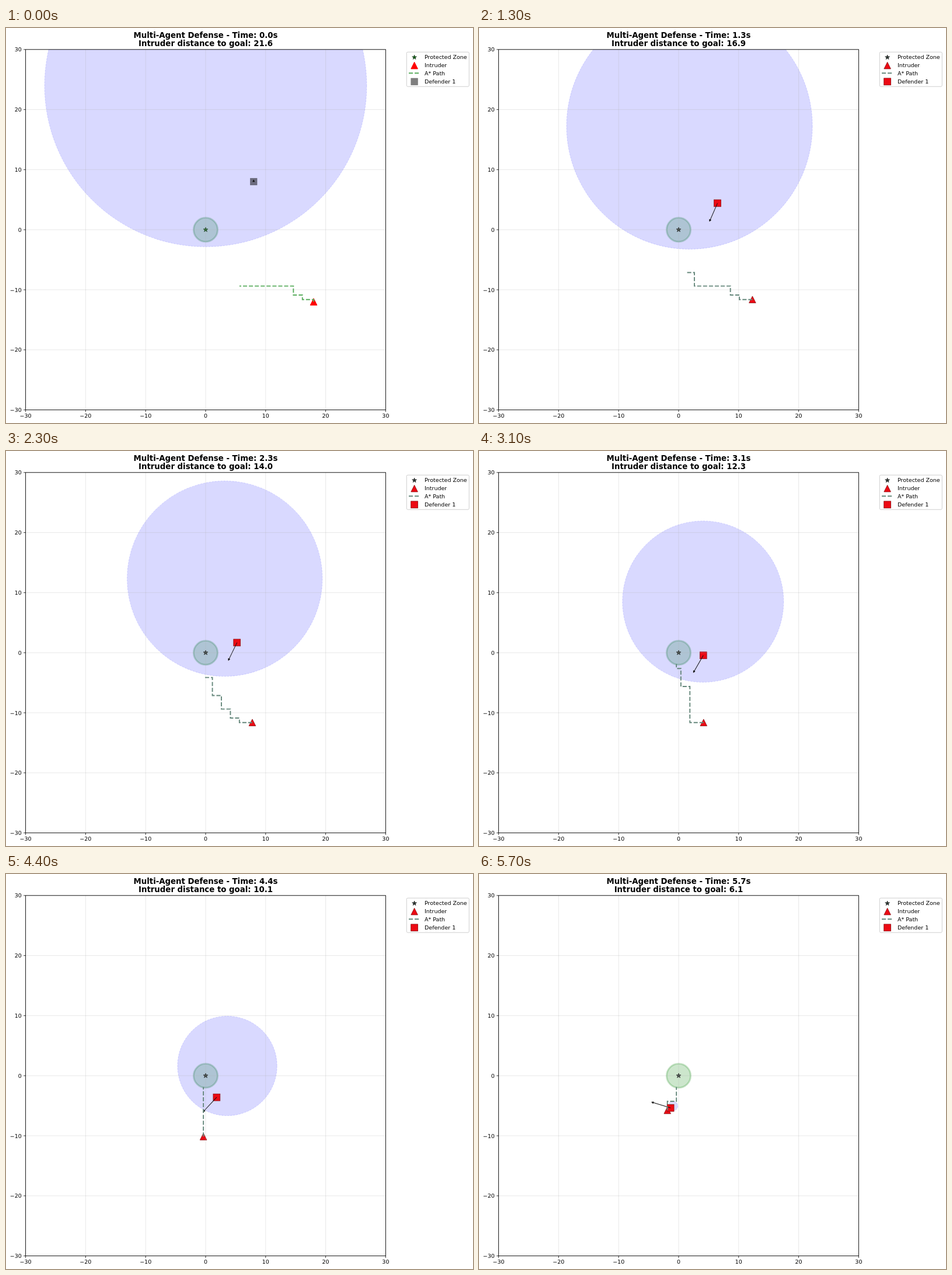
Write an HTML page that moves like this. It is 800x676 px and loops after 5.8 s.

```html
<!DOCTYPE html>
<html lang="en">
<head>
<meta charset="utf-8">
<title>Multi-Agent Defense</title>
<style>
html, body { margin: 0; width: 100%; height: 100%; overflow: hidden; background: #fff; }
svg { display: block; font: 9.5px "DejaVu Sans", sans-serif; }
.title { font-size: 13.3px; font-weight: bold; text-anchor: middle; }
</style>
</head>
<body>
<svg id="stage" width="800" height="676" viewBox="0 0 800 676"></svg>
<script>
const SCALE = 10.28, LOOP = 5800, STEP = 100;
const CELL = 0.75, ROW = -11.625, HORIZON = 14.25;
const INTRUDER_SPEED = 4.52, DEFENDER_SPEED = 3;
const GOAL = { x: -0.375, y: -1.875 };
const px = x => 342 + x * SCALE;
const py = y => 345.2 - y * SCALE;
const LEFT = px(-30), RIGHT = px(30), TOP = py(30), BOTTOM = py(-30);
const stage = document.getElementById('stage');
const clamp = u => Math.min(1, Math.max(0, u));

// Corners walked at constant speed
const corners = [
  [18, -12], [17.68, ROW], [-0.12, ROW], [GOAL.x, -11.37], [GOAL.x, -7.125], [-1.875, -7.125], [-1.875, 0]
];

function intruderAt(t) {
  let left = t * INTRUDER_SPEED;
  for (let i = 1; ; i++) {
    const [x, y] = corners[i - 1], dx = corners[i][0] - x, dy = corners[i][1] - y;
    const length = Math.hypot(dx, dy);
    if (left <= length) return { x: x + dx * left / length, y: y + dy * left / length };
    left -= length;
  }
}

// Bends slowly towards the intercept, then swerves after the intruder's last turn
function headingAt(t) {
  const degrees = 247 - 20 * clamp(t / 4.4) ** 3 - 64 * clamp((t - 4.95) / 0.75);
  return degrees * Math.PI / 180;
}

function defenderAt(t) {
  const dt = STEP / 1000;
  let x = 8, y = 8;
  for (let s = dt / 2; s < t; s += dt) {
    x += DEFENDER_SPEED * dt * Math.cos(headingAt(s));
    y += DEFENDER_SPEED * dt * Math.sin(headingAt(s));
  }
  return { x, y, heading: headingAt(t) };
}

// Staircase on the grid: first along the row, then towards the goal
function planFrom({ x, y }) {
  const points = [[x, y]];
  let length = 0;
  const go = (dx, dy) => {
    x += dx;
    y += dy;
    length += Math.abs(dx) + Math.abs(dy);
    points.push([x, y]);
  };
  if (y <= ROW) {
    const turn = CELL * Math.floor((x - 3 * CELL) / CELL) + CELL / 2;
    go(0, ROW - y);
    go(Math.max(turn, GOAL.x) - x, 0);
    if (x > 3) {
      go(0, CELL);
      go(-2 * CELL, 0);
      go(0, 2 * CELL);
    }
  }
  while (length < HORIZON && y < GOAL.y - 0.01) {
    const dx = GOAL.x - x, dy = GOAL.y - y;
    if (2 * Math.abs(dx) > dy + 0.01) go(Math.sign(dx) * Math.min(2 * CELL, Math.abs(dx)), 0);
    else go(0, Math.min(CELL, dy));
  }
  return points;
}

const line = (x1, y1, x2, y2, style) => `<path d="M${x1} ${y1}L${x2} ${y2}" ${style}/>`;
const text = (x, y, s, style = '') => `<text x="${x}" y="${y}" ${style}>${s}</text>`;
const circle = (x, y, r, style) => `<circle cx="${px(x)}" cy="${py(y)}" r="${r * SCALE}" ${style}/>`;
const triangle = (x, y, style) => `<path d="M${x} ${y - 5.8}l5.8 11.6h-11.6z" ${style}/>`;
const square = (x, y, style) => `<rect x="${x - 5.9}" y="${y - 5.9}" width="11.8" height="11.8" ${style}/>`;

function star(x, y, style) {
  const points = Array.from({ length: 10 }, (_, i) => {
    const r = i % 2 ? 1.6 : 4.1, a = i * Math.PI / 5;
    return `${x + r * Math.sin(a)},${y - r * Math.cos(a)}`;
  });
  return `<polygon points="${points.join(' ')}" ${style}/>`;
}

function arrow(p, length, angle) {
  const tip = length * SCALE;
  return `<g transform="translate(${px(p.x)} ${py(p.y)}) rotate(${-angle * 180 / Math.PI})" fill="#111" stroke="#111">
    <path d="M0 0H${tip}" stroke-width="1"/>
    <path d="M${tip} -1.5L${tip + 3.1} 0L${tip} 1.5z" stroke-width=".8"/></g>`;
}

let grid = '', axes = '';
for (let v = -30; v <= 30; v += 10) {
  const x = px(v), y = py(v), label = String(v).replace('-', '\u2212');
  const faint = 'stroke="#b0b0b0" stroke-opacity=".32" stroke-width=".9"';
  const tick = 'stroke="#000" stroke-width=".8"';
  grid += line(x, TOP, x, BOTTOM, faint) + line(LEFT, y, RIGHT, y, faint);
  axes += line(x, BOTTOM, x, BOTTOM + 3.4, tick) + line(LEFT, y, LEFT - 3.4, y, tick) +
    text(x, 667.3, label, 'text-anchor="middle"') + text(26.8, y + 3.6, label, 'text-anchor="end"');
}
const frame = `x="${LEFT}" y="${TOP}" width="${RIGHT - LEFT}" height="${BOTTOM - TOP}"`;
axes += `<rect ${frame} fill="none" stroke="#000" stroke-width=".9"/>`;

function render(t) {
  const idle = t === 0;
  const intruder = intruderAt(t), defender = defenderAt(t);
  const dx = defender.x - intruder.x, dy = defender.y - intruder.y;
  const edged = 'fill="#ec0a14" stroke="#8a1015" stroke-width=".8"';
  const red = idle ? 'fill="#f00" stroke="#f00"' : edged;
  const guard = idle ? 'fill="#000" fill-opacity=".5" stroke="#000" stroke-opacity=".3" stroke-width=".6"' : edged;
  const goal = idle ? 'fill="#0c5c10" stroke="#1c3c20" stroke-width=".7"' : 'fill="#2c3a34" stroke="#222" stroke-width=".8"';
  const dashed = `fill="none" stroke="${idle ? '#5aad5e' : '#66887c'}" stroke-width="1.9" stroke-dasharray="7.03 3.04"`;
  const route = planFrom(intruder).map(([x, y]) => `${px(x)},${py(y)}`).join(' ');

  // The large disc holds the points the defender reaches first
  stage.innerHTML = `
    <clipPath id="plot"><rect ${frame}/></clipPath>
    <g clip-path="url(#plot)">
      ${circle(0, 0, 2, 'fill="green" fill-opacity=".2" stroke="green" stroke-opacity=".22" stroke-width="2.9"')}
      ${circle(defender.x + 0.8 * dx, defender.y + 0.8 * dy, 1.2 * Math.hypot(dx, dy),
        'fill="#00f" fill-opacity=".15" stroke="#00f" stroke-opacity=".15" stroke-width=".95" stroke-dasharray="3.5 1.5"')}
      ${star(px(0), py(0), goal)}
      ${triangle(px(intruder.x), py(intruder.y), red)}
      ${square(px(defender.x), py(defender.y), guard)}
      ${arrow(defender, idle ? 0 : DEFENDER_SPEED, idle ? Math.PI / 2 : defender.heading)}
      ${grid}
      <polyline points="${route}" ${dashed}/>
    </g>
    ${axes}
    ${text(342, 16.6, `Multi-Agent Defense - Time: ${t.toFixed(1)}s`, 'class="title"')}
    ${text(342, 31.3, `Intruder distance to goal: ${Math.hypot(intruder.x, intruder.y).toFixed(1)}`, 'class="title"')}
    <rect x="686.3" y="41.2" width="107" height="59" rx="2" fill="#fff" stroke="#ccc" stroke-width=".95"/>
    ${star(699.6, 50.2, goal)}${triangle(699.6, 64.1, red)}
    ${line(690, 77.2, 709, 77.2, dashed)}${square(699.6, 91.8, guard)}
    ${['Protected Zone', 'Intruder', 'A* Path', 'Defender 1'].map((s, i) => text(717, 53.3 + i * 13.9, s)).join('')}`;
}

let shown = -1;
const begin = performance.now();
function tick() {
  const step = Math.floor((performance.now() - begin) % LOOP / STEP);
  if (step !== shown) render((shown = step) / 10);
  requestAnimationFrame(tick);
}
tick();
</script>
</body>
</html>
```
